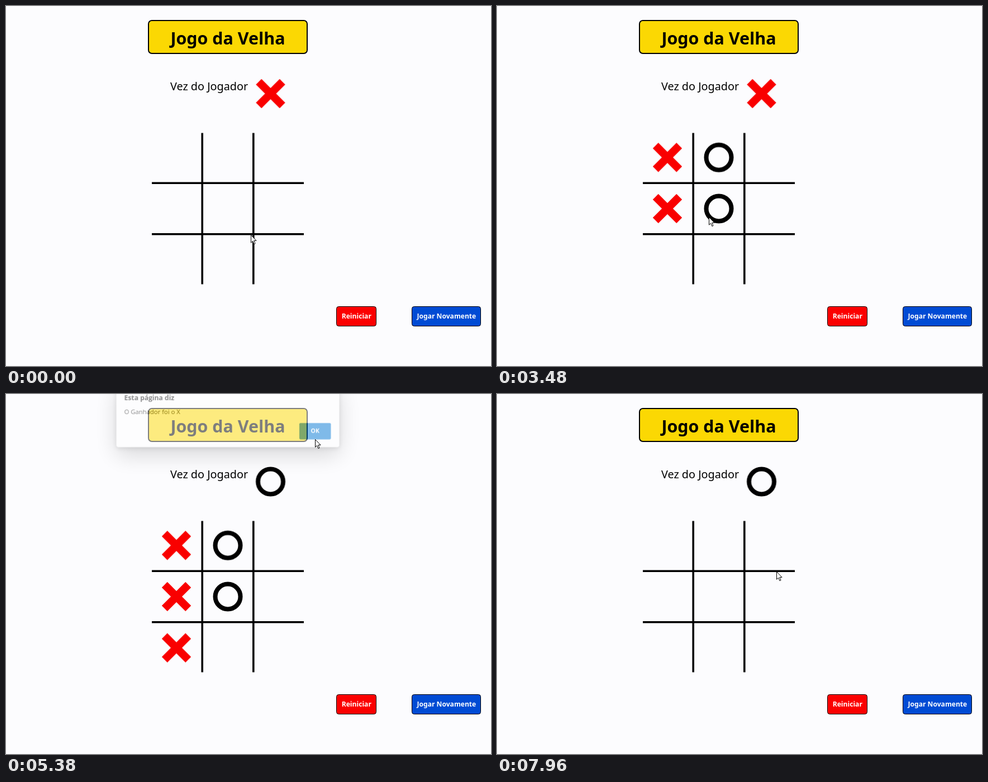
Write an HTML page that moves like this. It is 868x645 px and loops after 8 s.

```html
<!DOCTYPE html>
<html lang="pt-BR">
<head>
<meta charset="utf-8">
<title>Jogo da Velha</title>
<style>
  html, body { margin: 0; width: 100%; height: 100%; overflow: hidden; background: #fcfcfe; }
  .stage { position: relative; width: 868px; height: 645px; overflow: hidden; }
  svg { position: absolute; left: 0; top: 0; display: block; }
  svg text { font-family: "Noto Sans", sans-serif; }
  .title { font-size: 30.4px; font-weight: 700; text-anchor: middle; }
  .turn { font-size: 19.8px; font-weight: 500; }
  .label { font-size: 12.1px; font-weight: 700; fill: #fff; text-anchor: middle; }
  .grid { stroke: #000; stroke-width: 3.6; }

  .step { animation: 8s step-end infinite; }
  .first { animation-name: first; }
  .second { animation-name: second; }
  .third { animation-name: third; }
  .fourth { animation-name: fourth; }
  .fifth { animation-name: fifth; }
  .turn-x { animation-name: turn-x; }
  .turn-o { animation-name: turn-o; }
  .focus { animation-name: focus; }
  .arrow { animation-name: arrow; }
  .beam { animation-name: beam; }
  @keyframes first { 0% { opacity: 0 } 18.75% { opacity: 1 } 74%, 100% { opacity: 0 } }
  @keyframes second { 0% { opacity: 0 } 28% { opacity: 1 } 74%, 100% { opacity: 0 } }
  @keyframes third { 0% { opacity: 0 } 36% { opacity: 1 } 74%, 100% { opacity: 0 } }
  @keyframes fourth { 0% { opacity: 0 } 42% { opacity: 1 } 74%, 100% { opacity: 0 } }
  @keyframes fifth { 0% { opacity: 0 } 51.25% { opacity: 1 } 74%, 100% { opacity: 0 } }
  @keyframes turn-x {
    0%, 28%, 42% { opacity: 1 }
    18.75%, 36%, 51.25%, 100% { opacity: 0 }
  }
  @keyframes turn-o {
    0%, 28%, 42% { opacity: 0 }
    18.75%, 36%, 51.25%, 100% { opacity: 1 }
  }
  @keyframes focus { 0% { opacity: 0 } 74% { opacity: 1 } 90%, 100% { opacity: 0 } }
  @keyframes arrow { 0% { opacity: 1 } 59% { opacity: 0 } 60.6%, 100% { opacity: 1 } }
  @keyframes beam { 0% { opacity: 0 } 59% { opacity: 1 } 60.6%, 100% { opacity: 0 } }

  .dialog {
    position: absolute; left: 199px; top: -10px; width: 396px; height: 115px;
    border-radius: 4px; background: #fff; color: #1b1b1b;
    box-shadow: 0 14px 40px rgba(0, 0, 0, .3), 0 2px 8px rgba(0, 0, 0, .22);
    font-family: "Open Sans", sans-serif; line-height: 16px; white-space: nowrap;
    animation: dialog 8s linear infinite;
  }
  .dialog * { position: absolute; }
  .dialog b { left: 14px; top: 19px; font-size: 12px; font-weight: 700; }
  .dialog span { left: 14px; top: 44px; font-size: 11.2px; }
  .dialog i {
    left: 325px; top: 72px; width: 56px; height: 29px; border-radius: 2px;
    background: #0078d4; color: #fff; font: 700 10.5px/28px "Open Sans", sans-serif; text-align: center;
  }
  @keyframes dialog {
    0%, 51.6% { opacity: 0; transform: translateY(-20px) scale(1.015) }
    54%, 66% { opacity: 1; transform: none }
    68.5%, 100% { opacity: 0; transform: translateY(-20px) scale(1.015) }
  }

  .pointer { animation: pointer 8s ease-in-out infinite; }
  @keyframes pointer {
    0%, 6.5% { transform: translate(438px, 410px) }
    16.5%, 20% { transform: translate(302px, 280px) }
    27.3%, 28.2% { transform: translate(392px, 286px) }
    33.4%, 36.2% { transform: translate(312px, 376px) }
    41.5%, 43.5% { transform: translate(379px, 378px) }
    46.2% { transform: translate(300px, 431px) }
    48.9%, 51.3% { transform: translate(318px, 445px) }
    59%, 60.4% { transform: translate(472px, 40px) }
    64.5%, 67.3% { transform: translate(553px, 81px) }
    72%, 78.5% { transform: translate(775px, 548px) }
    79.625% { transform: translate(739px, 519px); animation-timing-function: ease-out }
    83.5% { transform: translate(330px, 225px) }
    88.2% { transform: translate(740px, 598px) }
    91% { transform: translate(800px, 590px) }
    97.5% { transform: translate(430px, 352px) }
    98.4% { transform: translate(458px, 347px) }
    99.5%, 100% { transform: translate(500px, 318px) }
  }
</style>
</head>
<body>
<div class="stage">
  <svg width="868" height="645" viewBox="0 0 868 645">
    <defs>
      <g id="x" fill="#f90000">
        <rect x="-30" y="-7" width="60" height="14" transform="rotate(45)"/>
        <rect x="-30" y="-7" width="60" height="14" transform="rotate(-45)"/>
      </g>
      <circle id="o" r="22.5" fill="none" stroke="#000" stroke-width="8"/>
    </defs>

    <rect x="255" y="26" width="284" height="59" rx="6" fill="#fbd803" stroke="#000" stroke-width="2"/>
    <text class="title" x="397" y="69">Jogo da Velha</text>
    <text class="turn" x="294" y="151">Vez do Jogador</text>
    <use href="#x" class="step turn-x" x="473.5" y="157"/>
    <use href="#o" class="step turn-o" x="473.5" y="157"/>

    <path class="grid" d="M351.2 227.5V498.5M442.8 227.5V498.5M261 317.3H533M261 408.7H533"/>
    <use href="#x" class="step first" x="305" y="271.3"/>
    <use href="#o" class="step second" x="397" y="271.3"/>
    <use href="#x" class="step third" x="305" y="363"/>
    <use href="#o" class="step fourth" x="397" y="363"/>
    <use href="#x" class="step fifth" x="305" y="454.7"/>

    <g stroke="#000">
      <rect x="591.5" y="538.5" width="71" height="35" rx="4" fill="#fb0000"/>
      <rect x="726.5" y="538.5" width="123" height="35" rx="4" fill="#004bd4"/>
      <rect class="step focus" x="727" y="539" width="122" height="34" rx="3.5" fill="none" stroke-width="2"/>
    </g>
    <text class="label" x="627.3" y="560.3">Reiniciar</text>
    <text class="label" x="788.4" y="560.3">Jogar Novamente</text>
  </svg>

  <div class="dialog"><b>Esta página diz</b><span>O Ganhador foi o X</span><i>OK</i></div>

  <svg width="868" height="645" viewBox="0 0 868 645">
    <g class="pointer">
      <path class="step arrow" d="M.5 .5V14.2L3.6 11.3L5.9 16.6L8 15.7L5.8 10.4H10Z" fill="#fff" stroke="#000"/>
      <path class="step beam" d="M-3 -7.5H-1L0 -6.5L1 -7.5H3M0 -6.5V6.5M-3 7.5H-1L0 6.5L1 7.5H3" fill="none" stroke="#000"/>
    </g>
  </svg>
</div>
</body>
</html>
```
